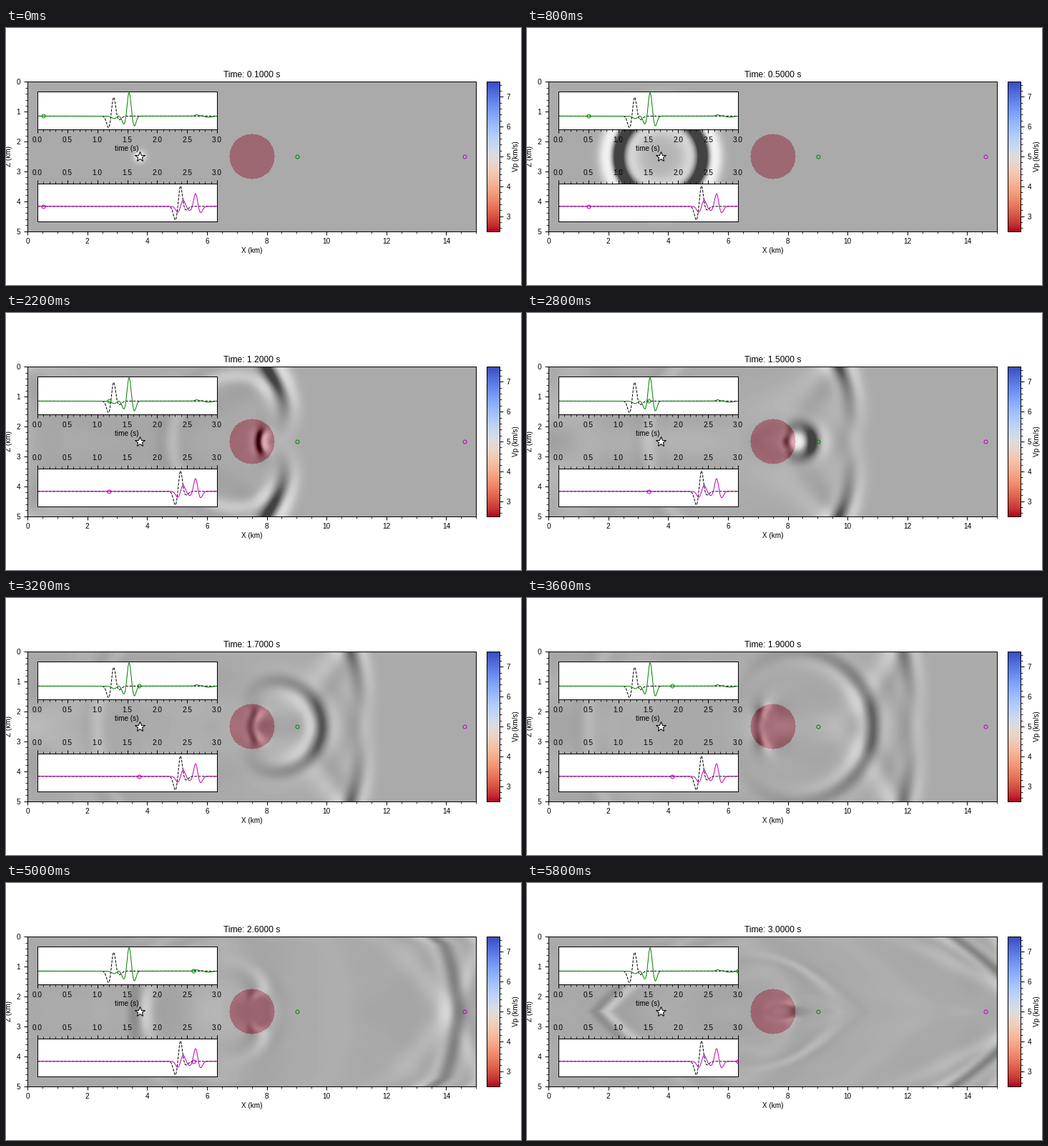
Animation of 720 by 360 pixels, one loop 6 s. Source, as a matplotlib script:

```python
import numpy as np
import matplotlib.pyplot as plt
from matplotlib.animation import FuncAnimation
from matplotlib.ticker import AutoMinorLocator, MultipleLocator

W, H, DPI = 720, 360, 72
FRAMES, STEP_T = 30, 0.1
SRC_X, BALL_X, BALL_R, MID_Z = 3.75, 7.5, 0.75, 2.5
V_BG, V_BALL = 5.0, 2.5
CELL, PAD, SUB = 0.025, 48, 40
COLS, ROWS = 601, 101

plt.rcParams.update({
    "font.family": "Liberation Sans", "font.size": 10,
    "axes.linewidth": 1, "lines.linewidth": 1,
})
for side in ("xtick", "ytick"):
    plt.rcParams.update({
        f"{side}.major.size": 5, f"{side}.minor.size": 2.8,
        f"{side}.major.width": 1, f"{side}.minor.width": 0.8,
        f"{side}.major.pad": 4.8, f"{side}.minor.pad": 4.8,
    })


def mirror(half):
    return np.vstack([half[:0:-1], half])


def simulate():
    """Acoustic wave on the lower half plane, mirrored at the axis of symmetry."""
    dt = STEP_T / SUB
    nx, nz = COLS + 2 * PAD, ROWS + PAD
    ix, iz = np.arange(nx), np.arange(nz)
    x, s = (ix - PAD) * CELL, iz * CELL
    inside = (x[None, :] - BALL_X) ** 2 + s[:, None] ** 2 <= BALL_R ** 2
    speed = np.where(inside, V_BALL, V_BG)
    coef = ((speed * dt / CELL) ** 2 / 12).astype(np.float32)

    # Absorbing margin
    dx = np.maximum(0, np.maximum(PAD - ix, ix - (nx - 1 - PAD)))
    dz = np.maximum(0, iz - (ROWS - 1))
    taper = np.exp(-(0.006 ** 2) * (dx[None, :] ** 2 + dz[:, None] ** 2))
    taper = taper.astype(np.float32)

    old = np.zeros((nz + 4, nx + 4), np.float32)
    cur = old.copy()
    core = (slice(2, -2), slice(2, -2))
    src = 2 + PAD + round(SRC_X / CELL)
    shown = np.zeros((ROWS, COLS), np.float32)
    shots = []
    for n in range(1, FRAMES * SUB + 1):
        t = n * dt
        cur[1], cur[0] = cur[3], cur[4]
        c = cur[core]
        lap = 16 * (cur[1:-3, 2:-2] + cur[3:-1, 2:-2]
                    + cur[2:-2, 1:-3] + cur[2:-2, 3:-1])
        lap -= (cur[:-4, 2:-2] + cur[4:, 2:-2]
                + cur[2:-2, :-4] + cur[2:-2, 4:])
        lap -= 60 * c
        lap *= coef
        new = old
        new[core] = (2 * c - old[core] + lap) * taper
        cur[core] *= taper
        a = (np.pi * 5 * (t - 0.2)) ** 2
        new[2, src] += (1 - 2 * a) * np.exp(-a)
        old, cur = cur, new
        # Outer rows stop updating first, the axis last
        live = min(ROWS, 1 + int(max(0, 3 - t) / 0.18 / CELL))
        shown[:live] = cur[2:2 + live, 2 + PAD:2 + PAD + COLS]
        if n % SUB == 0:
            shots.append(mirror(shown))
    return shots, mirror(speed[:ROWS, PAD:PAD + COLS])


shots, speed = simulate()
clip = 0.9 * shots[8][ROWS - 1, :80].max()


def pulses(t, parts):
    return sum(a * np.exp(-((t - c) / w) ** 2) for a, c, w in parts)


fig = plt.figure(figsize=(W / DPI, H / DPI), dpi=DPI, facecolor="white")


def place(x0, y0, x1, y1, **kw):
    return fig.add_axes([x0 / W, 1 - y1 / H, (x1 - x0) / W, (y1 - y0) / H], **kw)


def label(x, y, s, **kw):
    fig.text(x / W, 1 - y / H, s, ha="center", va="center", **kw)


def ticks(axis, step):
    axis.set_major_locator(MultipleLocator(step))
    axis.set_minor_locator(AutoMinorLocator())


def ring(ax, x, y, color):
    return ax.plot([x], [y], "o", ms=5, mfc="none", mec=color, mew=1, zorder=4)[0]


# Section
ax = place(30, 75.4, 657.3, 284.6)
e = CELL / 2
grid = dict(extent=(-e, 15 + e, 5 + e, -e), aspect="auto")
ax.imshow(speed, cmap="coolwarm_r", vmin=2.5, vmax=7.5,
          interpolation="nearest", zorder=1, **grid)
wave = ax.imshow(shots[0], cmap="Greys", vmin=-clip, vmax=0.99 * clip, alpha=0.7,
                 interpolation="bilinear", zorder=2, **grid)
ax.plot([SRC_X], [MID_Z], "*", ms=14, mfc="white", mec="black", mew=1, zorder=4)
ring(ax, 9.02, MID_Z, "g")
ring(ax, 14.62, MID_Z, "m")
ax.set(xlim=(0, 15), ylim=(5, 0))
ticks(ax.xaxis, 2)
ticks(ax.yaxis, 1)
title = ax.set_title("", fontsize=12, pad=6)
label(343.5, 312, "X (km)")
label(4, 180, "Z (km)", rotation=90)

# Velocity scale
bar = place(672, 75.4, 690, 284.6)
bar.imshow(np.linspace(0, 1, 256)[:, None], cmap="coolwarm_r", origin="lower",
           extent=(0, 1, 2.5, 7.5), aspect="auto")
bar.set_xticks([])
bar.yaxis.tick_right()
ticks(bar.yaxis, 1)
label(713.5, 180, "Vp (km/s)", rotation=90)

# Seismograms
ts = np.linspace(0, 3, 900)


def seismogram(top, bottom, base, color, plain, delayed):
    box = place(44.1, top, 295, bottom, facecolor="white", zorder=3)
    box.plot(ts, pulses(ts, plain), "k--")
    box.plot(ts, pulses(ts, delayed), color=color)
    box.set(xlim=(0, 3), ylim=(base - bottom, base - top), yticks=[])
    ticks(box.xaxis, 0.5)
    return box, ring(box, 0, 0, color)


_, dot_near = seismogram(
    89.3, 142, 123.4, "g",
    [(-17, 1.19, 0.05), (28, 1.272, 0.045), (-5.5, 1.36, 0.06)],
    [(-3.5, 1.28, 0.06), (1, 1.36, 0.03), (-12, 1.45, 0.05), (34, 1.53, 0.045),
     (-14.5, 1.615, 0.045), (2, 2.66, 0.04), (1, 2.75, 0.03), (-1.6, 2.86, 0.09)])
far, dot_far = seismogram(
    218.3, 271, 249.8, "m",
    [(-20, 2.307, 0.05), (30.5, 2.388, 0.045), (-5.5, 2.475, 0.06)],
    [(-8.5, 2.345, 0.05), (9, 2.432, 0.045), (-6, 2.55, 0.06), (19, 2.642, 0.045),
     (-9.5, 2.722, 0.05)])
far.xaxis.tick_top()
label(169, 169.5, "time (s)")


def draw(i):
    t = STEP_T * (i + 1)
    wave.set_data(shots[i])
    title.set_text(f"Time: {t:.4f} s")
    for dot in (dot_near, dot_far):
        dot.set_xdata([t])
    return wave, title, dot_near, dot_far


anim = FuncAnimation(fig, draw, frames=FRAMES, init_func=lambda: draw(0),
                     interval=200, repeat=True, repeat_delay=0, blit=False)
plt.show()
```
